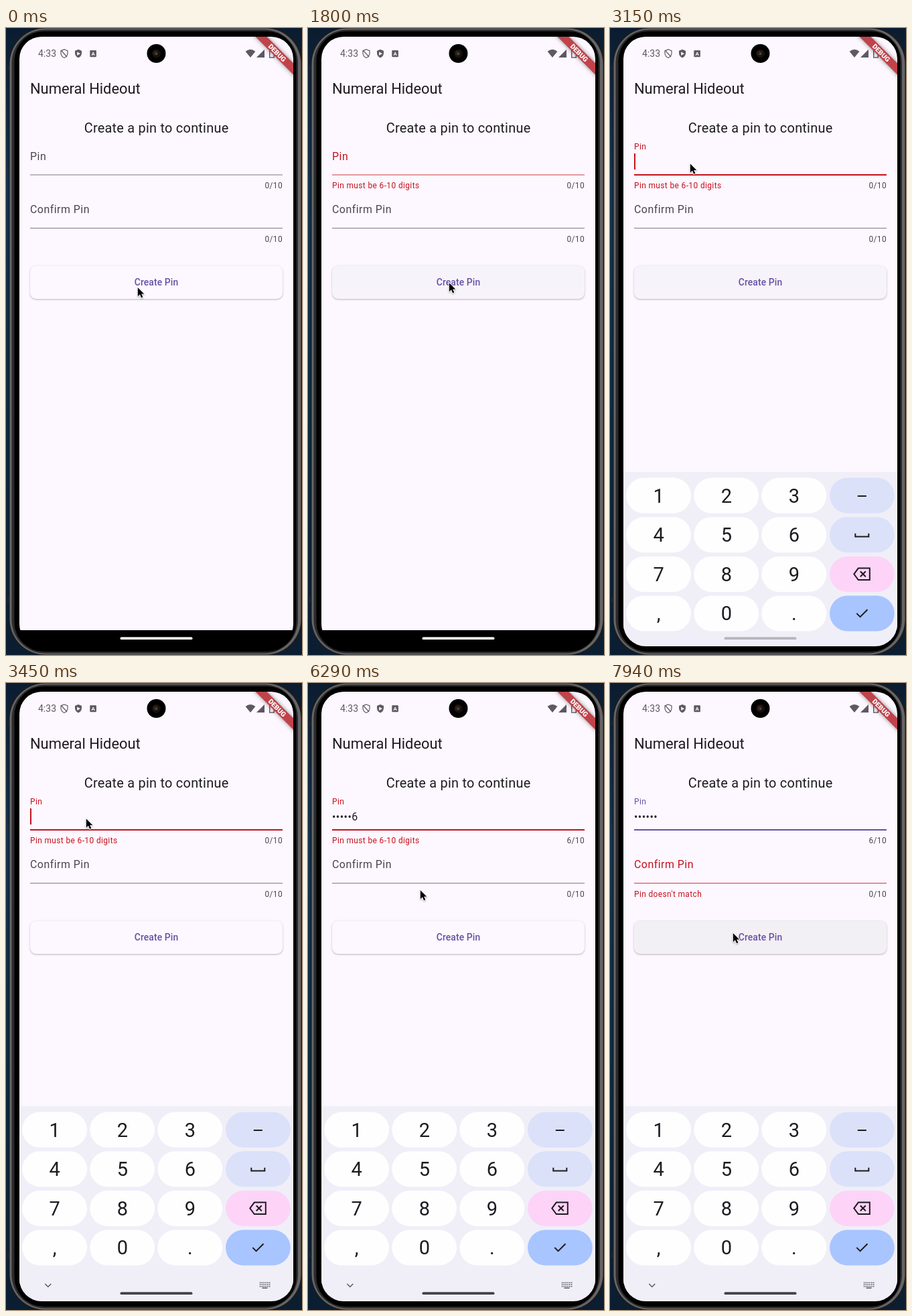
An HTML page with a canvas that plays this animation: 442 by 935 pixels, repeating every 8 s.

```html
<!DOCTYPE html>
<html lang="en">
<head>
<meta charset="utf-8">
<title>Pin setup</title>
<style>
  html, body { margin: 0; width: 100%; height: 100%; overflow: hidden; background: #000; }
  canvas { display: block; width: 442px; height: 935px; }
</style>
</head>
<body>
<canvas id="stage" width="442" height="935"></canvas>
<script>
const ctx = document.getElementById('stage').getContext('2d');
const LOOP = 8000;
const INK = '#1d1b20', MUTED = '#49454f', PURPLE = '#6750a4', RED = '#c4121c', PAPER = '#fdf7ff';
const ICON = '#5d5962';

// [start ms, values...]: each row holds until the next one
const POINTER = [
  [0, 196, 386], [1200, 201, 394], [1350, 207, 398], [1800, 210, 379],
  [1950, 207, 372], [2100, 194, 334], [2250, 162, 265], [2400, 130, 216],
  [2550, 112, 191], [2700, 119, 201.5], [5840, 120, 205], [5990, 124, 224],
  [6140, 135, 265], [6290, 167, 308], [6440, 176, 340], [6590, 182, 364], [6740, 183, 372]
];
const CARET = [[0, 0], [3150, 1], [3750, 0], [4040, 1], [6140, 0], [6590, 1], [7040, 0], [7640, 1], [7940, 0]];
const TYPED = [4040, 4190, 4490, 4790, 5090, 5540];
const PRESSES = [{ at: 300, x: 196, y: 386 }, { at: 7340, x: 183, y: 372 }];
const BUTTON = [[0, PAPER], [900, '#f7f3fa'], [3450, PAPER], [7940, '#f2eff5']];
const KEYBOARD = [[0, -1], [3150, 31], [3300, 6], [3450, 0]];

function at(rows, t) {
  let found = rows[0];
  for (const row of rows) if (row[0] <= t) found = row;
  return found.slice(1);
}

function rect(x, y, w, h, color) {
  ctx.fillStyle = color;
  ctx.fillRect(x, y, w, h);
}

function rounded(x, y, w, h, r, color) {
  ctx.beginPath();
  ctx.roundRect(x, y, w, h, r);
  if (color) { ctx.fillStyle = color; ctx.fill(); }
}

function disc(x, y, r, color) {
  ctx.beginPath();
  ctx.arc(x, y, r, 0, Math.PI * 2);
  ctx.fillStyle = color;
  ctx.fill();
}

function trace(points, close) {
  ctx.beginPath();
  points.forEach(([x, y], i) => i ? ctx.lineTo(x, y) : ctx.moveTo(x, y));
  if (close) ctx.closePath();
}

function poly(points, color) {
  trace(points, true);
  ctx.fillStyle = color;
  ctx.fill();
}

function line(points, color, width, close) {
  trace(points, close);
  ctx.strokeStyle = color;
  ctx.lineWidth = width;
  ctx.stroke();
}

function text(str, x, y, size, color, spacing = 0, align = 'left', weight = 400) {
  ctx.font = `${weight} ${size}px Roboto, sans-serif`;
  ctx.letterSpacing = spacing + 'px';
  ctx.textAlign = align;
  ctx.fillStyle = color;
  ctx.fillText(str, x, y);
  return ctx.measureText(str).width;
}

function drawPhone() {
  const wall = ctx.createLinearGradient(0, 0, 0, 935);
  wall.addColorStop(0, '#0b1c30');
  wall.addColorStop(0.25, '#12324f');
  wall.addColorStop(0.6, '#0a2b40');
  wall.addColorStop(1, '#0b1d31');
  rect(0, 0, 442, 935, wall);
  for (const [y, h] of [[56, 8], [204, 7], [849, 8]]) rect(2.5, y, 4, h, '#29292b');
  rounded(4, -1, 439, 937, 54, '#1b1b1d');
  rounded(5.5, 0.5, 435, 934, 53, '#666668');
  rounded(8.5, 2.5, 427.5, 930, 50, '#2b2b2d');
  rounded(12.5, 5, 421, 925, 44, '#000');
}

function shield(x, fill) {
  ctx.beginPath();
  ctx.moveTo(x, 32);
  ctx.lineTo(x + 5, 34);
  ctx.lineTo(x + 5, 38);
  ctx.quadraticCurveTo(x + 4.5, 42.5, x, 44.5);
  ctx.quadraticCurveTo(x - 4.5, 42.5, x - 5, 38);
  ctx.lineTo(x - 5, 34);
  ctx.closePath();
  if (fill) { ctx.fillStyle = ICON; ctx.fill(); }
  else { ctx.strokeStyle = ICON; ctx.lineWidth = 1.2; ctx.stroke(); }
}

function drawStatus() {
  text('4:33', 48, 43, 14, ICON);
  shield(87, false);
  line([[82.5, 33.5], [91, 43]], ICON, 1.2);
  shield(108, true);
  poly([[106.2, 35.5], [106.2, 41], [111, 38.2]], PAPER);
  rounded(125.3, 33.3, 9.6, 10, 1, ICON);
  text('A', 130.1, 41.4, 8, PAPER, 0, 'center', 700);
  ctx.beginPath();
  ctx.moveTo(365, 44);
  ctx.lineTo(357.6, 35);
  ctx.quadraticCurveTo(365, 29, 372.4, 35);
  ctx.closePath();
  ctx.fillStyle = ICON;
  ctx.fill();
  poly([[374, 44], [386, 44], [386, 32]], ICON);
  rect(395.5, 31.6, 3, 2, ICON);
  ctx.strokeStyle = ICON;
  ctx.lineWidth = 1.4;
  ctx.strokeRect(393.7, 33.5, 6.6, 10.5);
  disc(224.5, 38, 14, '#000');
  disc(224.5, 38, 6.5, '#15100d');
  disc(223.5, 37.5, 3.6, '#30231a');
  disc(224.5, 38.5, 1.5, '#5a4a32');
}

function drawBanner() {
  ctx.save();
  ctx.translate(429, 13);
  ctx.rotate(Math.PI / 4);
  ctx.shadowColor = 'rgba(0,0,0,.45)';
  ctx.shadowBlur = 6;
  rect(-60, 28, 120, 11.9, '#c0434a');
  ctx.shadowColor = 'transparent';
  text('DEBUG', 0, 37.6, 10.2, '#fff', 0, 'center', 900);
  ctx.restore();
}

function drawField(y, f) {
  const tone = f.error ? RED : f.focus ? PURPLE : MUTED;
  if (f.focus) text(f.label, 36, y - 37.7, 12, tone, 0.37);
  else text(f.label, 36, y - 22.3, 15.9, tone, 0.5);
  if (f.focus) rect(36, y - 1, 377, 2, tone);
  else rect(36, y - 0.5, 377, 1, f.error ? '#ce3b40' : '#7f7b84');
  if (f.error) text(f.error, 36, y + 20.3, 11.9, RED, 0.4);
  text(f.count + '/10', 413, y + 20.3, 11.9, MUTED, 0.4, 'right');
}

function drawButton(t) {
  ctx.save();
  ctx.shadowColor = 'rgba(0,0,0,.28)';
  ctx.shadowBlur = 2.5;
  ctx.shadowOffsetY = 1;
  rounded(36, 354.5, 377, 49.5, 9, at(BUTTON, t)[0]);
  ctx.restore();
  const press = PRESSES.find(p => t >= p.at && t < p.at + 600);
  if (press) {
    const n = Math.floor((t - press.at) / 150);
    ctx.save();
    rounded(36, 354.5, 377, 49.5, 9);
    ctx.clip();
    rect(36, 354, 377, 51, `rgba(103,80,164,${0.035 + 0.023 * n})`);
    disc(press.x, press.y, [24, 80, 165, 400][n], 'rgba(103,80,164,.1)');
    ctx.restore();
  }
  text('Create Pin', 224.5, 384.3, 13.9, PURPLE, 0.1, 'center', 500);
}

function drawEntry(t) {
  const n = TYPED.filter(ms => ms <= t).length;
  const shown = !n ? '' : t < 7040 ? '•'.repeat(n - 1) + n : '•'.repeat(n);
  const width = text(shown, 36, 204.5, 15.9, INK, 0.5);
  if (at(CARET, t)[0]) rect(36 + width, 187, 2, 24, t < 7940 ? RED : PURPLE);
}

function keyIcon(row, x, y) {
  ctx.lineJoin = 'miter';
  if (row === 0) line([[x - 6.5, y + 1], [x + 6.5, y + 1]], INK, 2);
  if (row === 1) line([[x - 10, y - 2], [x - 10, y + 2.7], [x + 10, y + 2.7], [x + 10, y - 2]], INK, 2);
  if (row === 2) {
    line([[x - 12, y], [x - 5.5, y - 8.7], [x + 11.5, y - 8.7], [x + 11.5, y + 8.7], [x - 5.5, y + 8.7]], INK, 2, true);
    line([[x - 2.5, y - 4], [x + 5.5, y + 4]], INK, 2);
    line([[x + 5.5, y - 4], [x - 2.5, y + 4]], INK, 2);
  }
  if (row === 3) line([[x - 8, y], [x - 2.7, y + 5.3], [x + 8.2, y - 5.6]], INK, 2);
}

function drawKeyboard(shift) {
  rect(20, 631 + shift, 409, 300, '#f0eff8');
  const side = ['#dce1fa', '#dce1fa', '#fdd4f8', '#a8c5ff'];
  ['123', '456', '789', ',0.'].forEach((keys, row) => {
    const y = 639.7 + row * 58.6 + shift;
    [...keys].forEach((key, col) => {
      const x = 24.2 + col * 101.1;
      rounded(x, y, 96.8, 53, 26.5, '#fefeff');
      text(key, x + 48.5, y + 36.8, 29, INK, 0, 'center');
    });
    rounded(328, y, 96.8, 53, 26.5, side[row]);
    keyIcon(row, 376.3, y + 26.4);
  });
  if (shift) return;
  line([[58.3, 896], [62.8, 900.5], [67.3, 896]], ICON, 1.5);
  for (let row = 0; row < 3; row++)
    for (let col = 0; col < 6; col++) rect(378.8 + col * 2.8, 893.5 + row * 2.8, 1.6, 1.6, ICON);
  rect(382.5, 901.5, 8, 1.5, ICON);
}

function drawPointer(x, y) {
  ctx.save();
  ctx.translate(x, y);
  ctx.shadowColor = 'rgba(0,0,0,.3)';
  ctx.shadowBlur = 2;
  ctx.shadowOffsetY = 1;
  const arrow = [[0.8, 1], [0.8, 14.2], [3.9, 11.3], [6.1, 16.3], [8.4, 15.3], [6.2, 10.4], [10.3, 10.4]];
  ctx.lineJoin = 'round';
  line(arrow, '#fff', 1.8, true);
  ctx.shadowColor = 'transparent';
  poly(arrow, '#000');
  ctx.restore();
}

function draw(t) {
  const shift = at(KEYBOARD, t)[0];
  const mismatch = t >= 7940;
  drawPhone();
  ctx.save();
  rounded(20, 13, 409, 909, 33);
  ctx.clip();
  rect(20, 13, 409, 885, PAPER);
  drawStatus();
  text('Numeral Hideout', 36, 98.2, 21.9, INK);
  text('Create a pin to continue', 224.6, 155.5, 19.9, INK, 0.25, 'center');
  drawField(219, {
    label: 'Pin',
    focus: t >= 2850,
    error: t >= 900 && !mismatch && 'Pin must be 6-10 digits',
    count: TYPED.filter(ms => ms <= t).length
  });
  drawField(298.5, { label: 'Confirm Pin', error: mismatch && "Pin doesn't match", count: 0 });
  drawEntry(t);
  drawButton(t);
  if (shift >= 0) drawKeyboard(shift);
  rounded(170.5, 908.3, 108, 3.8, 1.9, shift < 0 ? '#f4f4f4' : shift > 20 ? '#b7b6bd' : '#434248');
  drawBanner();
  ctx.restore();
  drawPointer(...at(POINTER, t));
}

const start = performance.now();
function tick() {
  draw((performance.now() - start) % LOOP);
  requestAnimationFrame(tick);
}
tick();
</script>
</body>
</html>
```
